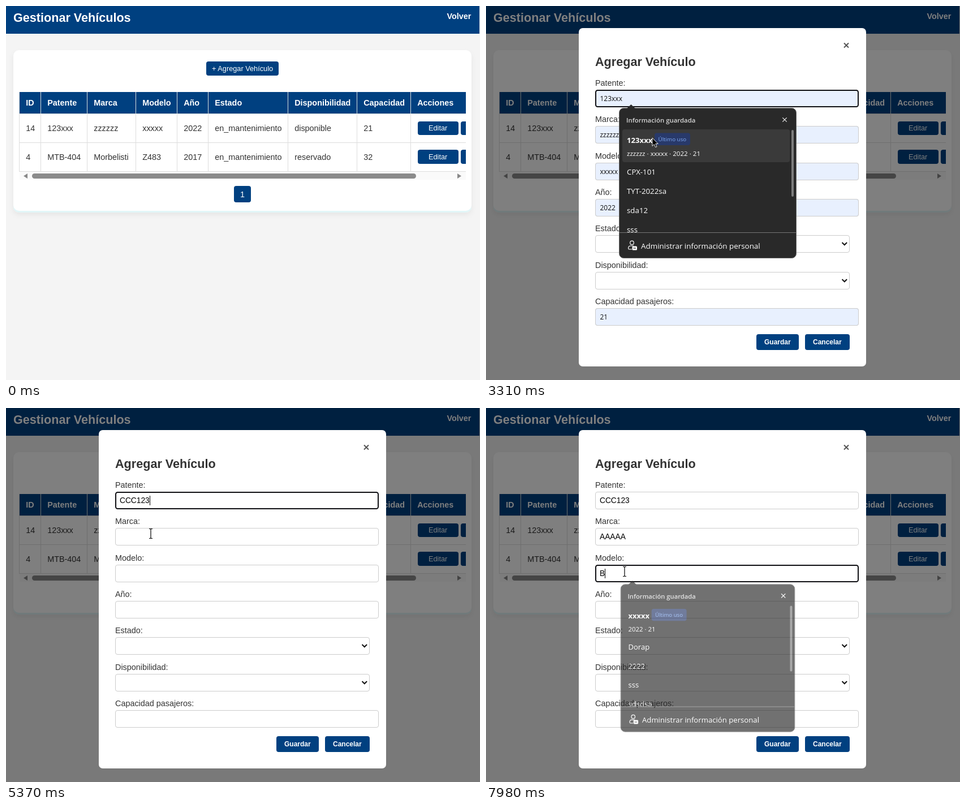
Write an HTML page that moves like this. It is 838x661 px and loops after 8 s.

```html
<!DOCTYPE html>
<html lang="es">
<head>
<meta charset="utf-8">
<title>Gestionar Vehículos</title>
<style>
  html, body { margin: 0; width: 100%; height: 100%; overflow: hidden; background: #f4f4f4; }
  svg { display: block; width: 838px; height: 661px; font-family: "Liberation Sans", Arial, sans-serif; white-space: pre; }
  .menu { font-family: "Open Sans", "Noto Sans", sans-serif; }
</style>
</head>
<body>
<svg viewBox="0 0 838 661">
  <defs>
    <filter id="shadow" x="-10%" y="-10%" width="120%" height="130%">
      <feDropShadow dx="0" dy="4" stdDeviation="5" flood-opacity=".06"/>
    </filter>
    <clipPath id="table"><rect x="23" y="151" width="790" height="160"/></clipPath>
    <clipPath id="list"><rect x="236" y="0" width="312" height="219"/></clipPath>
  </defs>
  <g id="page"></g>
  <g id="modal"></g>
  <g id="live"></g>
</svg>
<script>
const LOOP = 8000, NAVY = '#004080', MODAL_AT = 1300;
const $ = id => document.getElementById(id);

const rect = (x, y, w, h, fill, r = 0, extra = '') =>
  `<rect x="${x}" y="${y}" width="${w}" height="${h}" rx="${r}" fill="${fill}" ${extra}/>`;
const text = (x, y, str, size = 14.4, fill = '#333', weight = 400) =>
  `<text x="${x}" y="${y}" font-size="${size}" fill="${fill}" font-weight="${weight}">${str}</text>`;
const path = (d, extra) => `<path d="${d}" ${extra}/>`;
const stroke = (color, width) => `fill="none" stroke="${color}" stroke-width="${width}"`;
const button = (x, y, w, h, label, pad, fill = NAVY) =>
  rect(x, y, w, h, fill, 4) + text(x + pad, y + h / 2 + 4, label, 12.75, '#fff');
const boldButton = (x, y, w, h, label) =>
  rect(x, y, w, h, NAVY, 4) + text(x + 14, y + 18, label, 12, '#fff', 700);

// Page with the vehicle table
const columns = [24, 62, 144, 230, 303, 358, 499, 621, 716];
const heads = ['ID', 'Patente', 'Marca', 'Modelo', 'Año', 'Estado', 'Disponibilidad', 'Capacidad', 'Acciones'];
const rows = [
  ['14', '123xxx', 'zzzzzz', 'xxxxx', '2022', 'en_mantenimiento', 'disponible', '21'],
  ['4', 'MTB-404', 'Morbelisti', 'Z483', '2017', 'en_mantenimiento', 'reservado', '32'],
];
const cells = (row, y, ...style) => row.map((s, i) => text(columns[i] + 11.2, y, s, 14.4, ...style)).join('');

function tableMarkup() {
  const lines = columns.map(x => `M${x - .5} 152V293`).join('') + 'M23 190.5H813M23 241.5H813M23 292.5H813';
  return `<g clip-path="url(#table)">` +
    rect(23, 152, 800, 39, NAVY) + path(lines, stroke('#ddd', 1)) +
    cells(heads, 176, '#fff', 700) +
    rows.map((row, i) => {
      const y = 190 + 51 * i;
      return cells(row, y + 31) + button(728, y + 14 - i, 72, 24 + i, 'Editar', 19) + rect(804, y + 14 - i, 72, 24 + i, NAVY, 4);
    }).join('') +
    rect(24, 293, 789, 14, '#fafafa') +
    path('M38 296V305L31 300.5ZM798 296V305L805 300.5Z', 'fill="#888"') + '</g>';
}

$('page').innerHTML =
  rect(0, 0, 838, 661, '#f4f4f4') + rect(0, 0, 837, 49, NAVY) +
  text(13, 28, 'Gestionar Vehículos', 21.6, '#fff', 700) +
  text(779.5, 23, 'Volver', 14.4, '#fff', 700) +
  rect(13, 79, 810, 286, '#e2f6f8', 10, 'filter="url(#shadow)"') + rect(13, 78, 810, 284, '#fff', 10) +
  tableMarkup() +
  '<g id="thumb">' + rect(46, 296, 679, 9, 'currentColor', 4.5) + '</g>' +
  '<g id="add"></g>' +
  rect(403, 318, 30, 29, NAVY, 4) + text(414, 338, '1', 14.4, '#fff');

// Form dialog
const labels = ['Patente', 'Marca', 'Modelo', 'Año', 'Estado', 'Disponibilidad', 'Capacidad pasajeros'];
const fieldY = i => Math.round(148 + 64.35 * i);
const isSelect = i => i === 4 || i === 5;

$('modal').innerHTML =
  rect(0, 0, 838, 661, '#000', 0, 'opacity=".5"') + rect(164, 39, 508, 598, '#fff', 7) +
  path('M633 65.5l8 8m0 -8l-8 8', stroke('#555', 2)) +
  text(193, 106, 'Agregar Vehículo', 21.6, '#333', 700) +
  labels.map((label, i) => {
    const y = fieldY(i);
    return text(193, y - 7, label + ':') +
      rect(193.5, y + .5, isSelect(i) ? 449 : 465, 30, '#fff', 3.5, 'stroke="#ccc"') +
      (isSelect(i) ? path(`M629.5 ${y + 13}l4.3 4.3l4.3 -4.3`, stroke('#111', 2)) : '');
  }).join('') +
  boldButton(478, 580, 75, 28, 'Guardar') + boldButton(564, 580, 79, 28, 'Cancelar');

// Suggestion menus
const patentes = { field: 0, recent: '123xxx', badge: 298, detail: 'zzzzzz · xxxxx · 2022 · 21', items: ['CPX-101', 'TYT-2022sa', 'sda12', 'sss'] };
const menus = [
  { ...patentes, from: 2330, to: 3833 },
  { ...patentes, from: 4120, to: 4440 },
  { field: 0, items: ['CPX-101', 'czcxzczx', 'CPX-122'], from: 4440, to: 4630 },
  { field: 1, recent: 'zzzzzz', badge: 294, detail: 'xxxxx · 2022 · 21', items: ['Nevuro', 'wwww', '12321', 'ssss'], from: 5700, to: 6720 },
  { field: 2, recent: 'xxxxx', badge: 291, detail: '2022 · 21', items: ['Dorap', '2222', 'sss', 'sdsdsa'], from: 7590, to: 7930 },
];
const clamp = v => Math.max(0, Math.min(1, v));
const menuAlpha = (m, t) => Math.min(clamp((t - m.from + 20) / 90), clamp(1 - (t - m.to) / 150)) * (t >= m.from);
const menuTop = m => fieldY(m.field) + 33;
const menuHeight = m => m.recent ? 264 : 143;

function menuMarkup(m, alpha, hovered) {
  const h = menuHeight(m), scale = .95 + .05 * alpha, first = m.recent ? 117 : 58;
  const recent = m.recent ? (hovered ? rect(241, 37, 296, 58, '#3a3a3a', 4) : '') +
    text(249, 61, m.recent, 13.2, '#fff', 700) + rect(m.badge, 43.5, 63, 21.5, '#28396a', 4) +
    text(m.badge + 6.5, 58, 'Último uso', 9.8, '#7fabf5') + text(249, 84, m.detail, 11.6, '#fff') : '';
  const footer = m.recent ? rect(540, 38, 4, 118, '#7d7d7d', 2) + rect(236, 219, 312, 1, '#777') +
    path('M258 249h-5c-2 0-2-6 2-6h6', stroke('#fff', 1.2)) +
    `<circle cx="258" cy="237.5" r="3.3" ${stroke('#fff', 1.2)}/>` + rect(258.5, 243.5, 8.5, 7, '#fff', 1.5) +
    path('M260.5 247h4.5', stroke('#292929', 1.2)) +
    text(274, 248, 'Administrar información personal', 13.4, '#fff') : '';
  return `<g class="menu" opacity="${alpha}" transform="translate(392 ${menuTop(m) + h / 2}) scale(${scale}) translate(-392 ${-h / 2})">` +
    rect(235.5, -.5, 313, h + 1, '#292929', 8, 'stroke="#6a6a6a"') + path('M249 0l7.5 -7l7.5 7z', 'fill="#292929"') +
    text(248, 25, 'Información guardada', 11.4, '#d6d6d6', 600) + path('M524.3 16.3l7.4 7.4m0 -7.4l-7.4 7.4', stroke('#eee', 1.2)) +
    `<g clip-path="url(#list)">${recent}${m.items.map((s, i) => text(249, first + 34 * i, s, 13.3, '#fff')).join('')}</g>${footer}</g>`;
}

// Typing: field, text and the time of each key
const typing = [
  { focus: 2330, blur: 5680, value: 'CCC123', keys: [4440, 4630, 4870, 4950, 5130, 5310] },
  { focus: 5680, blur: 7590, value: 'AAAAA', keys: [6720, 6840, 6960, 7070, 7170] },
  { focus: 7590, blur: LOOP, value: 'B', keys: [7930] },
];
const charWidth = { C: .722, A: .667, B: .667 };
const preview = { 0: '123xxx', 1: 'zzzzzz', 2: 'xxxxx', 3: '2022', 6: '21' };

function fieldsMarkup(t, previewing) {
  let out = '';
  if (previewing) for (const [i, value] of Object.entries(preview)) {
    const y = fieldY(+i);
    out += rect(193.5, y + .5, 465, 30, '#e8f0fe', 3.5, 'stroke="#ccc"') +
      `<g class="menu">${text(201.5, y + 20, value, 12, '#111')}</g>`;
  }
  typing.forEach(({ focus, blur, value, keys }, i) => {
    const y = fieldY(i), pressed = keys.filter(k => k <= t), typed = value.slice(0, pressed.length);
    if (!previewing) out += text(201, y + 20, typed, 13.75, '#000');
    if (t < focus || t >= blur) return;
    out += rect(194, y + 1, 464, 29, 'none', 3.5, 'stroke="#101014" stroke-width="2"');
    const caretOn = (t - (pressed.at(-1) ?? focus)) % 1000 < 500 || t > 3780 && t < 4440;
    const end = [...typed].reduce((x, c) => x + 13.75 * (charWidth[c] ?? .556), 201);
    if (caretOn && !previewing) out += rect(Math.round(end), y + 7, 1, 17, '#000');
  });
  return out;
}

// Pointer: time, x, y
const route = [
  [110, 806, 656], [350, 690, 480], [560, 540, 300], [740, 428, 140], [810, 408, 87], [890, 404, 106], [940, 404, 106],
  [1130, 409, 114], [1620, 409, 114], [1720, 411, 100], [1800, 385, 112], [2070, 244, 161], [2560, 244, 161],
  [2850, 294, 233], [3310, 294, 233], [3780, 296, 216], [3930, 297, 205], [4040, 301, 142], [4090, 302, 164],
  [5369, 302, 164], [5370, 256, 222], [7180, 256, 222], [7360, 245, 289], [LOOP, 245, 289],
];
function pointerAt(t) {
  const i = route.findIndex(p => p[0] > t);
  if (i < 1 || t > 4900 && t < 5370) return null;
  const [a, x0, y0] = route[i - 1], [b, x1, y1] = route[i], k = (t - a) / (b - a);
  return { x: x0 + (x1 - x0) * k, y: y0 + (y1 - y0) * k };
}
const inside = (p, x, y, w, h) => p && p.x >= x && p.x <= x + w && p.y >= y && p.y <= y + h;

const shapes = {
  arrow: path('M0 0V14.5L3.3 11.4L5.6 16.6L8 15.6L5.8 10.5H10.2Z', 'fill="#000" stroke="#fff" stroke-width=".9"'),
  beam: path('M-3 -8.5h2.2l.8 1l.8 -1H3M0 -7.5V7.5M-3 8.5h2.2l.8 -1l.8 1H3', stroke('#000', 1.2)),
  hand: path('M0 1c0-2 3-2 3 0v6l6 1c3 .5 3 2 2.5 5l-1.500 6h-8l-5-7c-1-2 1-3 3-1z', 'fill="#fff" stroke="#000"'),
};

function draw(t) {
  const open = t >= MODAL_AT, p = pointerAt(t);
  const visible = menus.map(m => ({ m, alpha: menuAlpha(m, t) })).filter(v => v.alpha > 0);
  const overMenu = visible.some(({ m }) => inside(p, 236, menuTop(m), 312, menuHeight(m)));
  const overItem = visible.some(({ m }) => m.recent && inside(p, 241, menuTop(m) + 37, 296, 58));
  const overField = !overMenu && labels.some((_, i) => !isSelect(i) && inside(p, 193, fieldY(i), 466, 31));
  const overAdd = inside(p, 354, 98, 128, 25);

  $('thumb').style.color = !open && inside(p, 46, 294, 679, 13) ? '#636363' : '#8b8b8b';
  $('add').innerHTML = button(354, 98, 128, 25, '+ Agregar Vehículo', 10, overAdd && !open ? '#003366' : NAVY);
  $('modal').style.display = open ? '' : 'none';

  let shape = 'arrow';
  if (overAdd && t < 1360) shape = 'hand';
  else if (open && overField) shape = 'beam';
  $('live').innerHTML = (open ? fieldsMarkup(t, overItem) : '') +
    visible.map(({ m, alpha }) => menuMarkup(m, alpha, overItem)).join('') +
    (p ? `<g transform="translate(${Math.round(p.x)} ${Math.round(p.y)})">${shapes[shape]}</g>` : '');
}

function tick() {
  draw(performance.now() % LOOP);
  requestAnimationFrame(tick);
}
tick();
</script>
</body>
</html>
```
